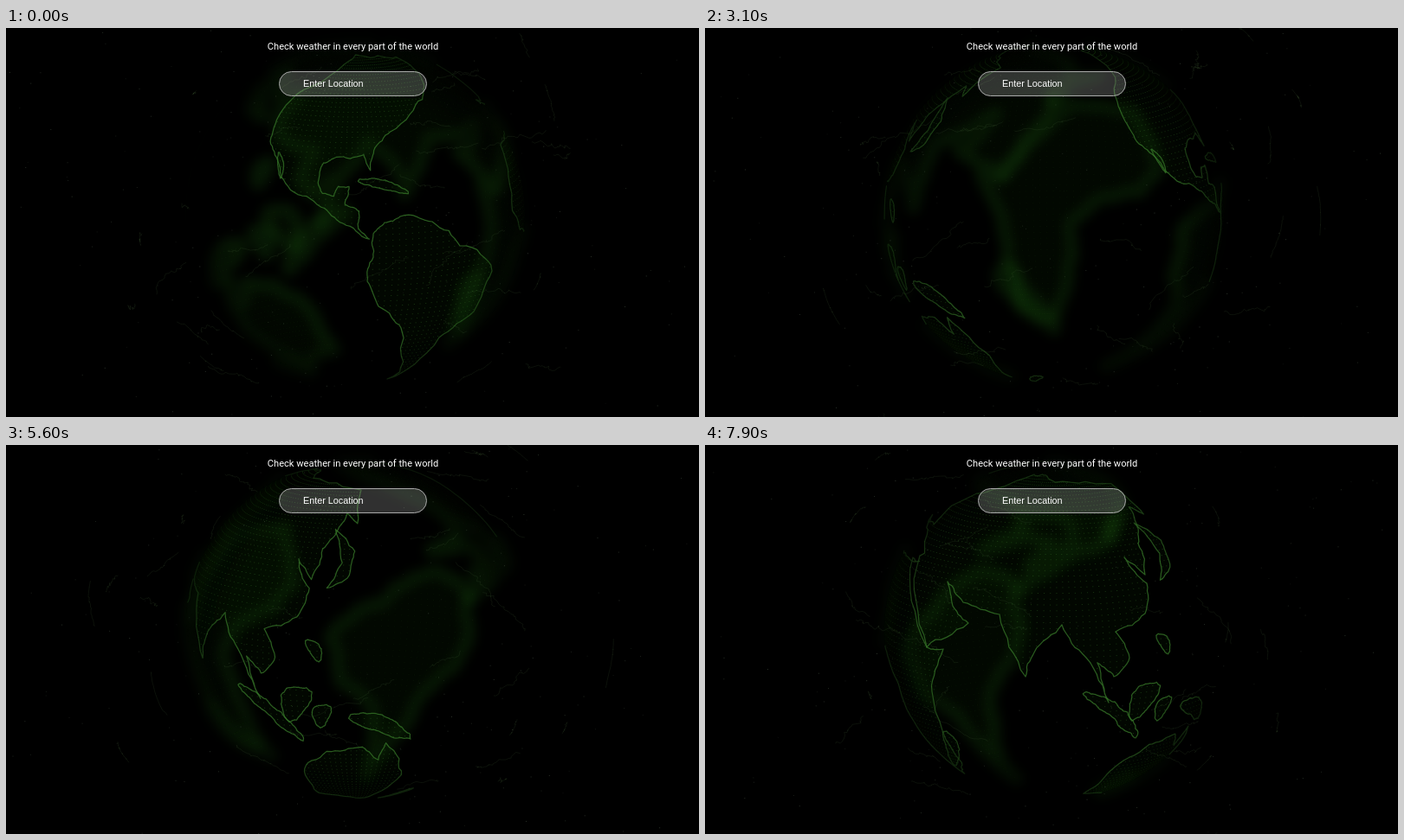
These frames come from a looping animation (800 px wide and 450 px high, 8000 ms). An HTML page with a canvas:

```html
<!DOCTYPE html>
<html lang="en">
<head>
<meta charset="utf-8">
<title>World weather</title>
<style>
  html, body { margin: 0; width: 100%; height: 100%; overflow: hidden; background: #000; }
  canvas { position: absolute; left: 0; top: 0; }
  h1 { position: absolute; left: 0; top: 13px; width: 801px; margin: 0; text-align: center; color: #fff;
       font: 400 11.08px/17px Roboto, sans-serif; white-space: nowrap; }
  .field { position: absolute; left: 315px; top: 49.5px; width: 171px; height: 29px; box-sizing: border-box;
           padding-left: 27px; border: 1px solid #aaa; border-radius: 15px; background: rgba(255,255,255,.19);
           color: #fff; font: 10.8px/27px "Liberation Sans", Arial, sans-serif; }
</style>
</head>
<body>
<canvas id="view" width="800" height="450"></canvas>
<h1>Check weather in every part of the world</h1>
<div class="field">Enter Location</div>
<script>
const CX = 403, CY = 214, R = 196, RAD = Math.PI / 180, TURN = 2 * Math.PI;
const TILT = 11.5 * RAD, SPIN = 23.7 * RAD, ST = Math.sin(TILT), CT = Math.cos(TILT);
const ctx = document.getElementById('view').getContext('2d');
const layer = Object.assign(document.createElement('canvas'), { width: 800, height: 450 });
const g = layer.getContext('2d');

let seed = 11;
const rnd = (a = 0, b = 1) => {
  seed = (seed * 16807) % 2147483647;
  return a + (b - a) * seed / 2147483647;
};

// Orthographic view of the tilted globe: place is {lon, lat}, z > 0 faces the viewer
function project(p, t, r = 1) {
  const a = p.lon + SPIN * t, c = Math.cos(p.lat), s = Math.sin(p.lat), n = c * Math.cos(a);
  return { x: CX + R * r * c * Math.sin(a), y: CY - R * r * (s * CT - n * ST), z: n * CT + s * ST };
}

// Inverse: key points of the stage at time t, on the near (1) or far (-1) side
function trace(t, side, ...xy) {
  const out = [];
  for (let i = 0; i < xy.length; i += 2) {
    let X = (xy[i] - CX) / R, Y = (CY - xy[i + 1]) / R;
    const k = Math.max(1, Math.hypot(X, Y) * 1.002);
    X /= k; Y /= k;
    const Z = side * Math.sqrt(Math.max(0, 1 - X * X - Y * Y));
    out.push({ lon: Math.atan2(X, Z * CT - Y * ST) - SPIN * t, lat: Math.asin(Y * CT + Z * ST) });
  }
  return out;
}

// Island: a lobed ellipse, turned by deg
function island(t, x, y, rx, ry, deg) {
  const c = Math.cos(deg * RAD), s = Math.sin(deg * RAD), xy = [];
  for (let a = 0; a < TURN - .01; a += TURN / 14) {
    const k = 1 + .15 * Math.sin(3 * a), u = rx * k * Math.cos(a), v = ry * k * Math.sin(a);
    xy.push(x + u * c - v * s, y + u * s + v * c);
  }
  return trace(t, 1, ...xy);
}

const northAmerica = trace(1.3, 1, 420,30, 398,75, 383,110, 384,133, 402,158, 426,190, 465,206, 490,222, 517,237,
  506,226, 505,206, 490,200, 491,179, 480,180, 477,192, 464,190, 457,178, 458,155, 470,147, 497,141, 508,158,
  505,135, 512,112, 518,72, 500,50, 455,28);
const southAmerica = trace(0, 1, 424,238, 437,225, 455,218, 492,224, 524,252, 561,281, 540,328, 500,358, 440,406,
  456,347, 430,322, 417,293, 424,265);
const eurasia = [
  ...trace(7.9, 1, 248,128, 256,234, 304,206, 285,182, 280,158, 298,182, 340,196, 370,268, 380,240, 412,208,
    440,246, 466,298, 453,252, 472,268, 490,246, 474,216, 508,195, 510,160, 484,130, 508,150, 500,114),
  ...trace(4.9, 1, 345,98, 362,78, 370,90, 388,52, 352,31),
  ...trace(7.9, 1, 380,34, 285,70, 264,92),
  ...trace(3.9, -1, 412,52, 345,80)];
const africa = [
  ...trace(7.9, 1, 240,130, 256,234, 275,236, 262,285),
  ...trace(2.3, -1, 410,322, 440,350, 470,295, 482,230),
  ...trace(3.9, -1, 395,195, 440,186, 467,160, 442,92, 345,88)];
const australia = trace(6.2, 1, 376,380, 410,355, 452,348, 466,362, 478,342, 484,378, 430,407, 380,404);
const japan = trace(6.2, 1, 413,98, 440,122, 438,150, 414,166, 428,136);

const lands = [
  northAmerica, southAmerica, eurasia, africa, australia, japan,
  island(1.3, 407, 163, 15, 3.5, 70),   // Baja
  island(0, 436, 182, 29, 5, 14),       // Cuba
  island(7.9, 285, 350, 20, 7, 72),     // Madagascar
  island(6.2, 404, 238, 14, 7, 55),     // Luzon
  island(6.2, 379, 300, 23, 16, -50),   // Borneo
  island(6.2, 410, 313, 14, 10, -60),   // Sulawesi
  island(6.2, 347, 311, 48, 7, 38),     // Sumatra and Java
  island(6.2, 474, 321, 32, 10, 18),    // New Guinea
  island(3.9, 406, 406, 12, 2, -15)     // New Zealand
].map(roughen);

// Keep neighbouring longitudes together, then break each edge into a rough coast
function roughen(land) {
  land.forEach((p, i) => {
    if (i) p.lon -= TURN * Math.round((p.lon - land[i - 1].lon) / TURN);
  });
  for (let round = 0; round < 3; round++)
    land = land.flatMap((p, i) => {
      const q = land[(i + 1) % land.length], dx = q.lon - p.lon, dy = q.lat - p.lat;
      const k = Math.hypot(dx, dy) < .5 ? rnd(-.1, .1) : 0;
      return [p, { lon: p.lon + dx / 2 - dy * k, lat: p.lat + dy / 2 + dx * k }];
    });
  return land;
}

// Dot grid over the land
const dots = [], STEP = 2 * RAD;
for (const land of lands) {
  const shape = new Path2D(), lons = land.map(p => p.lon), lats = land.map(p => p.lat);
  land.forEach(p => shape.lineTo(p.lon * 1000, p.lat * 1000));
  shape.closePath();
  for (let lat = Math.ceil(Math.min(...lats) / STEP) * STEP; lat < Math.max(...lats); lat += STEP)
    for (let lon = Math.ceil(Math.min(...lons) / STEP) * STEP; lon < Math.max(...lons); lon += STEP * 1.15)
      if (ctx.isPointInPath(shape, lon * 1000, lat * 1000)) dots.push({ lon, lat });
}

// Faint threads and specks drifting around the globe
const threads = Array.from({ length: 36 }, () => {
  let lon = rnd(0, TURN), lat = rnd(-.9, .9);
  const slope = rnd(-.6, .6);
  const line = Array.from({ length: 26 }, () =>
    ({ lon: lon += rnd(-.004, .024), lat: lat += .009 * slope + rnd(-.009, .009) }));
  return { line, r: rnd(1, 1.6) };
});
const specks = Array.from({ length: 300 }, () =>
  ({ lon: rnd(0, TURN), lat: Math.asin(rnd(-.95, .95)), r: rnd(.8, 2.6), a: rnd(.1, .36) }));

function strokeSide(pts, side) {
  g.beginPath();
  pts.forEach((p, i) => {
    const q = pts[(i + 1) % pts.length];
    if (p.z * side > 0 && q.z * side > 0) { g.moveTo(p.x, p.y); g.lineTo(q.x, q.y); }
  });
  g.stroke();
}

// Points of the other side are pushed out to the limb
function fillSide(pts, side) {
  if (!pts.some(p => p.z * side > 0)) return;
  g.beginPath();
  for (const p of pts) {
    const k = p.z * side > 0 ? 1 : R / Math.hypot(p.x - CX, p.y - CY);
    g.lineTo(CX + (p.x - CX) * k, CY + (p.y - CY) * k);
  }
  g.fill();
}

const rim = g.createRadialGradient(CX, CY + 5, R * .75, CX, CY + 5, R * 1.03);
rim.addColorStop(0, '#000');
rim.addColorStop(1, 'rgba(0,0,0,.2)');

// One side of the land, fading towards the rim
function drawSide(shapes, side, width, stroke, fill, filter) {
  g.clearRect(0, 0, 800, 450);
  g.lineCap = g.lineJoin = 'round';
  g.lineWidth = width;
  g.strokeStyle = stroke;
  g.fillStyle = fill;
  for (const s of shapes) { fillSide(s, side); strokeSide(s, side); }
  g.globalCompositeOperation = 'destination-in';
  g.fillStyle = rim;
  g.fillRect(0, 0, 800, 450);
  g.globalCompositeOperation = 'source-over';
  ctx.filter = filter;
  ctx.drawImage(layer, 0, 0);
  ctx.filter = 'none';
}

function draw(t) {
  const shapes = lands.map(land => land.map(p => project(p, t)));
  ctx.fillStyle = '#000';
  ctx.fillRect(0, 0, 800, 450);
  drawSide(shapes, -1, 16, 'rgba(28,90,18,.2)', 'rgba(25,85,15,.1)', 'blur(6px)');

  for (const s of specks) {
    const p = project(s, t, s.r);
    ctx.fillStyle = `rgba(120,140,115,${s.a})`;
    ctx.fillRect(p.x, p.y, 1, 1);
  }
  ctx.lineWidth = .7;
  ctx.strokeStyle = 'rgba(70,100,60,.25)';
  for (const { line, r } of threads) {
    ctx.beginPath();
    for (const p of line) { const q = project(p, t, r); ctx.lineTo(q.x, q.y); }
    ctx.stroke();
  }

  for (const d of dots) {
    const p = project(d, t), fade = Math.min(1, Math.abs(p.z) * 1.5);
    ctx.fillStyle = `rgba(58,120,45,${fade * (p.z > 0 ? .42 : .1)})`;
    ctx.fillRect(p.x - .6, p.y - .4, 1.2, .9);
  }
  drawSide(shapes, 1, 1.25, 'rgba(56,122,42,.75)', 'rgba(25,75,15,.09)', 'none');
}

let last = -1;
function tick() {
  const step = Math.floor(performance.now() % 8000 / 100);
  if (step !== last) draw((last = step) / 10);
  requestAnimationFrame(tick);
}
tick();
</script>
</body>
</html>
```
